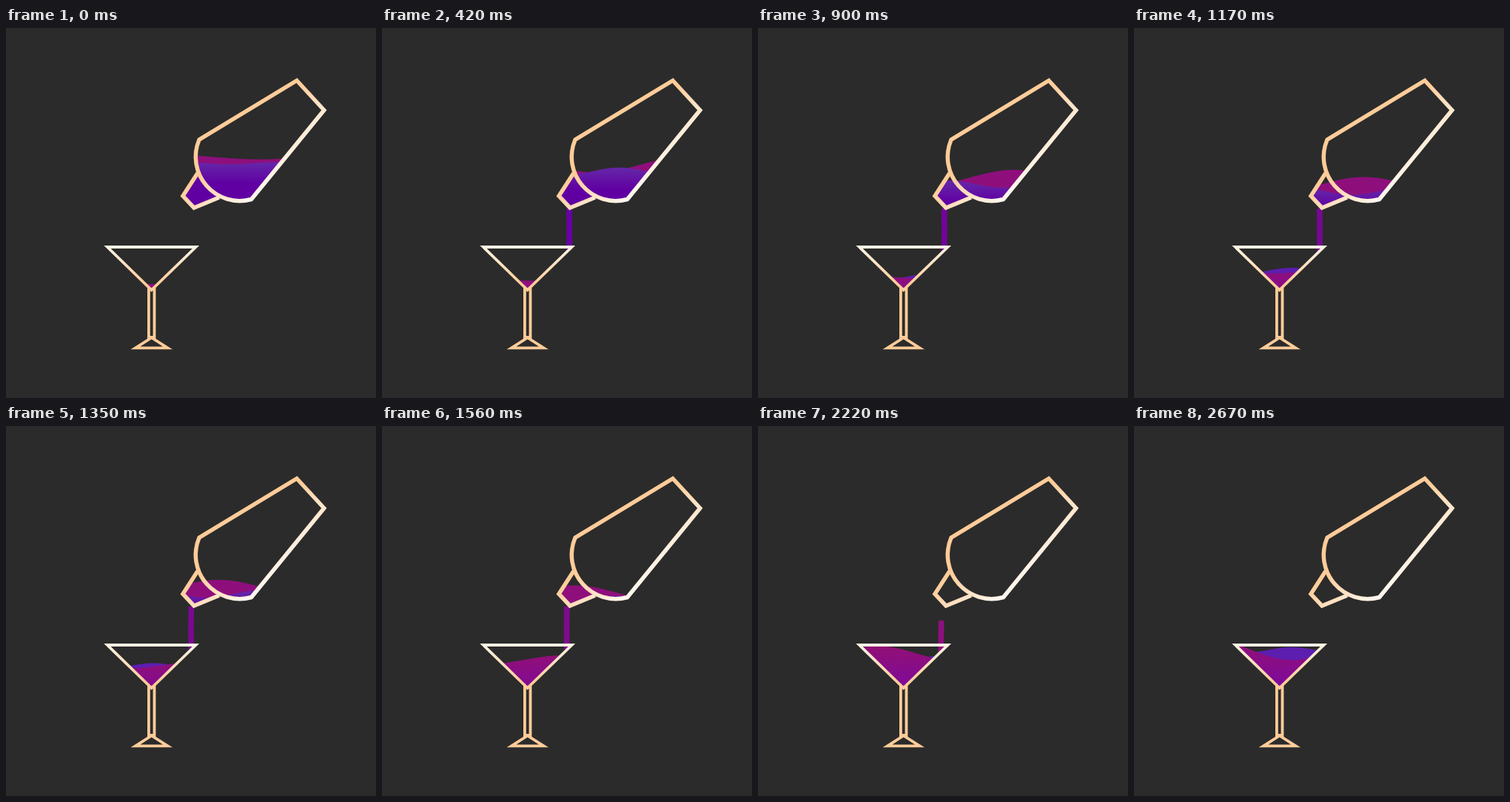
These frames come from a looping animation (500x500 px, 2.7 s). An HTML page:

```html
<!DOCTYPE html>
<html lang="en">
<head>
<meta charset="utf-8">
<title>Pouring a drink</title>
<style>
  html, body { margin: 0; width: 100%; height: 100%; overflow: hidden; background: #2b2b2b; }
  svg { display: block; width: 100vw; height: 100vh; }
</style>
</head>
<body>
<svg viewBox="0 0 500 500">
  <defs>
    <linearGradient id="bottleLine" gradientUnits="userSpaceOnUse" x1="213" y1="242" x2="259" y2="294">
      <stop stop-color="#ffcc99"/><stop offset="1" stop-color="#fff7ee"/>
    </linearGradient>
    <linearGradient id="glassLine" gradientUnits="userSpaceOnUse" x1="0" y1="294" x2="0" y2="345">
      <stop stop-color="#fff7e8"/><stop offset="1" stop-color="#ffcc99"/>
    </linearGradient>
    <linearGradient id="violet" gradientUnits="userSpaceOnUse" x1="0" x2="0">
      <stop stop-color="#6524a8"/><stop offset="1" stop-color="#6000a2"/>
    </linearGradient>
    <linearGradient id="magenta" gradientUnits="userSpaceOnUse" x1="0" x2="0">
      <stop stop-color="#900f78"/><stop offset="1" stop-color="#7c0a9c"/>
    </linearGradient>
    <path id="body" d="M393 71 L429.8 111 L331.5 231.5 A59.5 59.5 0 0 1 261 151 Z"/>
    <path id="neck" d="M259 196 L239 227 L254 243 L288 229"/>
    <path id="bowl" d="M137 296 H256.5 L196.6 354 Z"/>
    <clipPath id="inBottle"><use href="#body"/><use href="#neck"/></clipPath>
    <clipPath id="inGlass"><use href="#bowl"/></clipPath>
    <clipPath id="fall"><path d="M0 0 H500 V296 H256.5 L196.6 354 L137 296 H0 Z"/></clipPath>
  </defs>
  <rect width="500" height="500" fill="#2b2b2b"/>
  <g clip-path="url(#fall)"><path id="stream"/></g>
  <g clip-path="url(#inBottle)">
    <path id="bottleBack" fill="#8e0f7c"/>
    <path id="bottleFront" fill="url(#violet)"/>
  </g>
  <g clip-path="url(#inGlass)">
    <path id="glassBack" fill="#5c1eae"/>
    <path id="glassFront" fill="url(#magenta)"/>
  </g>
  <g fill="none" stroke="url(#bottleLine)" stroke-width="5.5">
    <use href="#neck"/>
    <use href="#body"/>
  </g>
  <g fill="none" stroke="#ffcc99" stroke-width="3.8">
    <path d="M192.9 352 V418 M200.5 352 V418 M191 353 H202.4 M191 418 H202.4"/>
    <path d="M175 432.3 L196.7 418.5 L218.5 432.3 Z"/>
    <use href="#bowl" stroke="url(#glassLine)"/>
  </g>
</svg>
<script>
const LOOP = 2700, STEP = 30;
const DRIFT = 0.13, FALL = 0.37;
const POUR = 240, CUT = 2170;
const el = id => document.getElementById(id);
const clamp = v => Math.min(1, Math.max(0, v));
const mix = (a, b, k) => a + (b - a) * k;

// Height of the drink in the glass: a trickle, then fast, then slower as the bowl widens
const fillKeys = [[0, 346], [800, 338.5], [1560, 316], [LOOP, 302]];
function glassLevel(t) {
  const i = fillKeys.findIndex(k => k[0] > t);
  const [t0, y0] = fillKeys[i - 1], [t1, y1] = fillKeys[i];
  return mix(y0, y1, (t - t0) / (t1 - t0));
}

// Draws liquid below a sine surface; amp is the height of the crest above mid
function drawWave(id, from, to, floor, mid, amp, length, crest) {
  let d = `M${from} ${floor}`;
  for (let x = from; x <= to; x += 3) {
    const y = mid - amp * Math.cos(2 * Math.PI * (x - crest) / length);
    d += `L${x} ${y.toFixed(2)}`;
  }
  el(id).setAttribute('d', d + `V${floor}Z`);
}

function shade(id, y1, y2) {
  el(id).setAttribute('y1', y1);
  el(id).setAttribute('y2', y2);
}

function drawBottle(t) {
  const level = 174.5 + 0.036 * Math.max(0, t - 200);
  const grow = clamp(t / 400), shift = DRIFT * t;
  const wave = (id, ...rest) => drawWave(id, 234, 384, 250, ...rest);
  wave('bottleBack', level + 2.5 * grow, mix(3, 10.5, grow), 240, 463 - shift);
  wave('bottleFront', level + mix(8, 11.2, grow), mix(1.5, 5, grow), 143, 518 - shift);
  shade('violet', level + 9, level + 36);
}

function drawGlass(t) {
  const level = glassLevel(t);
  const sink = 12 * Math.max(0, Math.sin(Math.PI * (t - 1300) / 1100)) * (t < 2400);
  const wave = (id, ...rest) => drawWave(id, 135, 261, 356, ...rest);
  wave('glassBack', level + sink, 3.5 * clamp(t / 800), 120, 213 + 0.08 * (2670 - t));
  wave('glassFront', level, 10.5 * (t / 2220) ** 1.5, 220, 450 - DRIFT * t);
  shade('magenta', level - 5, level + 50);
}

function drawStream(t) {
  const top = 244 + FALL * Math.max(0, t - CUT);
  const bottom = Math.min(t < CUT ? 302 : 330, 244 + FALL * (t - POUR));
  const s = el('stream');
  if (bottom - top < 1) {
    s.setAttribute('d', '');
    return;
  }
  const mid = 254.4 - 0.003 * t, l = mid - 3.8, r = mid + 3.8;
  const cap = t < CUT ? 1 : 3, h = (top + bottom) / 2;
  const bulge = 0.8 * Math.sin(t / 130);
  s.setAttribute('d', `M${l + cap} ${top}H${r - cap}Q${r} ${top} ${r} ${top + cap}`
    + `Q${r + bulge} ${h} ${r} ${bottom}H${l}Q${l + bulge} ${h} ${l} ${top + cap}`
    + `Q${l} ${top} ${l + cap} ${top}Z`);
  const k = clamp((t - 420) / 1800);
  s.setAttribute('fill', `rgb(${mix(104, 141, k)},${mix(0, 16, k)},${mix(166, 126, k)})`);
}

function tick() {
  const t = Math.floor(performance.now() % LOOP / STEP) * STEP;
  drawBottle(t);
  drawGlass(t);
  drawStream(t);
  requestAnimationFrame(tick);
}
tick();
</script>
</body>
</html>
```
